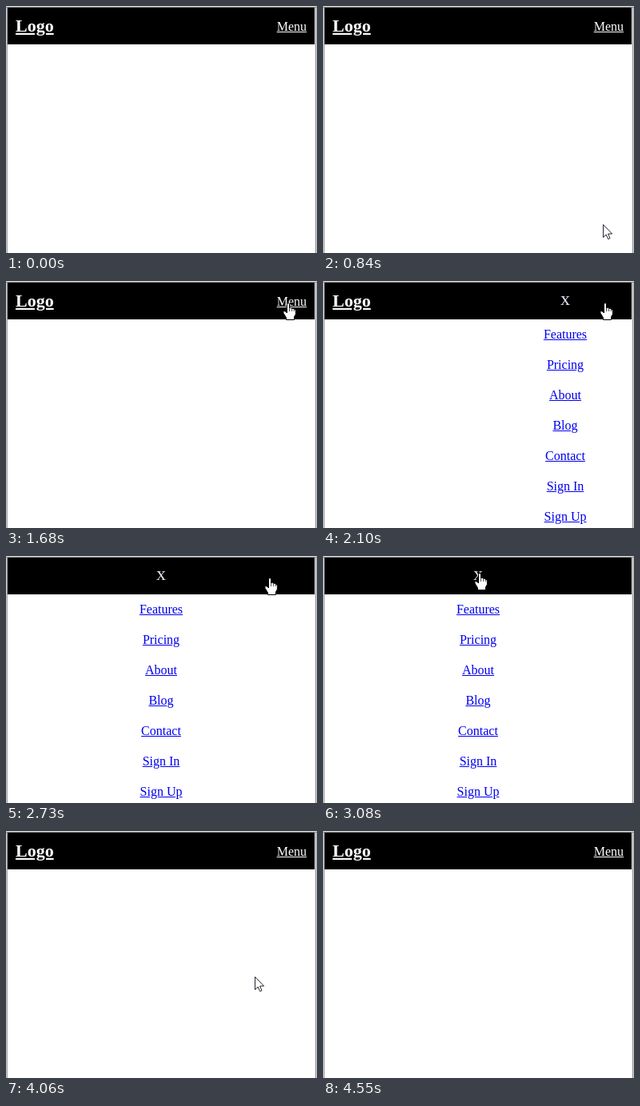
Animation, 389 px wide and 309 px high, one loop 4.62 s. Source, as an HTML page:

```html
<!DOCTYPE html>
<html lang="en">
<head>
<meta charset="utf-8">
<title>Sliding menu</title>
<style>
  :root { --loop: 4620ms; }
  html, body { margin: 0; width: 100%; height: 100%; overflow: hidden; background: #fff; }
  body { font: 16px/18px "Liberation Serif", "Times New Roman", serif; }
  a { color: inherit; text-decoration: underline; }

  .stage { position: relative; width: 389px; height: 309px; overflow: hidden; background: #fff; }
  .page { position: absolute; left: 2px; top: 2px; width: 384px; height: 307px; overflow: hidden; }
  .bar { position: relative; height: 46px; background: #000; color: #fff; }
  .logo { position: absolute; left: 10px; top: 10px; font-size: 22px; line-height: 25px; font-weight: bold; }
  .open { position: absolute; right: 10px; top: 15px; }

  .panel { position: absolute; inset: 0; background: #fff; text-align: center;
    animation: slide var(--loop) step-end infinite; }
  .close { position: absolute; left: 0; right: 0; top: 7px; font-size: 24px; line-height: 26px; color: #dfdff2; }
  .panel ul { list-style: none; margin: 0; padding: 0; color: #00e; }
  .panel li { padding: 10px 0; }

  /* window edges */
  .edge { position: absolute; }
  .top { left: 0; top: 0; width: 389px; height: 2px; background: linear-gradient(#dcdcdc 50%, #8c8c8c 50%); }
  .left { left: 0; top: 0; width: 2px; height: 309px; background: linear-gradient(90deg, #c6c8d0 50%, #a2a2a4 50%); }
  .right { left: 386px; top: 0; width: 3px; height: 309px;
    background: linear-gradient(90deg, #e6e6e6 1px, #9a9a9c 1px 2px, #cfcfd3 2px); }

  .cursor { position: absolute; left: 0; top: 0; width: 1px; height: 1px; overflow: visible;
    stroke-linejoin: round; animation: move var(--loop) step-end infinite, show var(--loop) step-end infinite; }
  .arrow { animation: arrow var(--loop) step-end infinite; }
  .hand { animation: hand var(--loop) step-end infinite; }

  /* 70 ms ticks: one tick is 1.515% of the loop */
  @keyframes slide {
    0% { transform: translateX(385px); }
    42.42% { transform: translateX(365px); }
    43.93% { transform: translateX(270px); }
    45.45% { transform: translateX(109px); }
    46.96% { transform: translateX(30px); }
    48.48% { transform: none; }
    77.27% { transform: translateX(165px); }
    78.78% { transform: translateX(303px); }
    80.3% { transform: translateX(363px); }
    81.81%, 100% { transform: translateX(385px); }
  }
  @keyframes move {
    0% { transform: translate(334px, 300px); }
    16.66% { transform: translate(334px, 300px); animation-timing-function: steps(2); }
    19.69% { transform: translate(366px, 246px); animation-timing-function: steps(3); }
    24.24% { transform: translate(368px, 129px); animation-timing-function: steps(2); }
    27.27% { transform: translate(356px, 67px); animation-timing-function: steps(6); }
    36.36% { transform: translate(353px, 27px); }
    59.09% { transform: translate(330px, 27px); animation-timing-function: steps(5); }
    66.66% { transform: translate(196px, 21px); }
    84.84% { transform: translate(229px, 64px); animation-timing-function: steps(2); }
    87.87% { transform: translate(311px, 182px); animation-timing-function: steps(2); }
    90.9%, 100% { transform: translate(357px, 283px); }
  }
  @keyframes show {
    0% { opacity: 0; }
    16.66% { opacity: 1; }
    92.42%, 100% { opacity: 0; }
  }
  @keyframes arrow {
    0% { opacity: 1; }
    34.84% { opacity: 0; }
    81.81%, 100% { opacity: 1; }
  }
  @keyframes hand {
    0% { opacity: 0; }
    34.84% { opacity: 1; }
    81.81%, 100% { opacity: 0; }
  }
</style>
</head>
<body>
<div class="stage">
  <div class="page">
    <div class="bar"><a class="logo">Logo</a><a class="open">Menu</a></div>
    <div class="panel">
      <div class="bar"><span class="close">x</span></div>
      <ul>
        <li><a>Features</a></li>
        <li><a>Pricing</a></li>
        <li><a>About</a></li>
        <li><a>Blog</a></li>
        <li><a>Contact</a></li>
        <li><a>Sign In</a></li>
        <li><a>Sign Up</a></li>
      </ul>
    </div>
  </div>
  <div class="edge left"></div>
  <div class="edge right"></div>
  <div class="edge top"></div>
  <svg class="cursor">
    <path class="arrow" fill="#fff" stroke="#23232e"
      d="M.5 .5V16.5L4.2 13L6.7 18.6L9 17.6L6.6 12H11.6Z"/>
    <g class="hand" stroke="#000">
      <path fill="#fff" d="M-1.5 2Q-1.5 .5 0 .5T1.5 2V6.5Q4 5.6 4.6 7.3Q6.6 6.6 7.3 8.3Q9.3 8 9.4 10.2V14.5L7.5 18V21.5H-2.5V19L-5.8 13.5Q-7 11 -5 10.5Q-3.5 10.5 -1.5 13Z"/>
      <path fill="none" stroke-width=".7" d="M1.5 6.5V11M4.6 7.5V11M7.3 8.5V11"/>
    </g>
  </svg>
</div>
</body>
</html>
```
